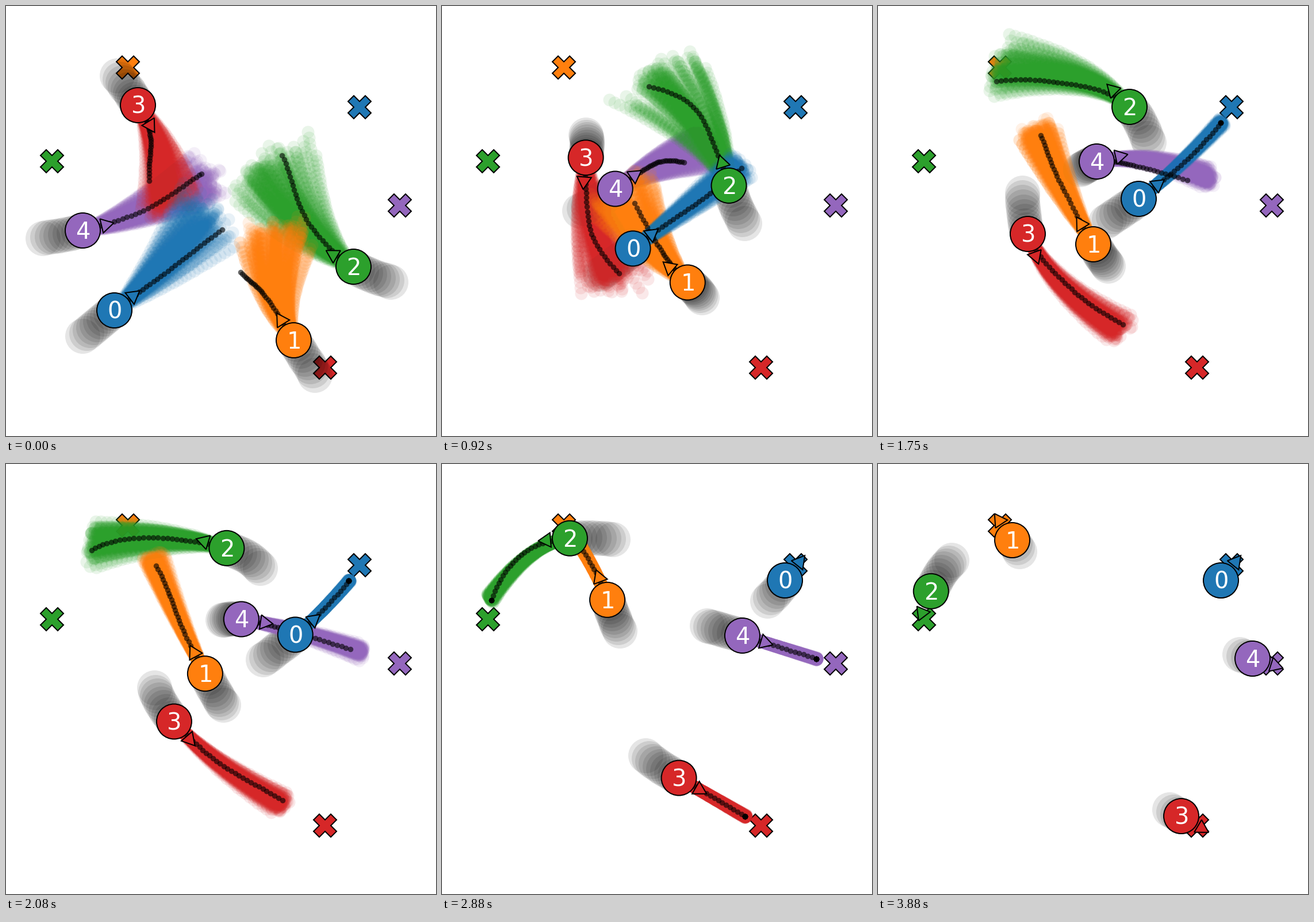
Recreate the animation shown at these times as a matplotlib script. Size 748x748 px, loop 3.92 s.

```python
import numpy as np
import matplotlib.pyplot as plt
from matplotlib.animation import FuncAnimation
from matplotlib.patches import Circle, RegularPolygon

SIZE = 748
FRAMES, INTERVAL = 98, 40
STEPS = 94              # simulation steps per loop, 24 per second
HORIZON, TRAIL = 30, 9  # planned steps ahead, past steps shown
CRUISE = 7.75           # top speed, pixels per step
SAMPLES = 60
RADIUS = 30.5
KEYS = (-9, 0, 14, 30, 42, 59, 81)

fig = plt.figure(figsize=(SIZE / 72, SIZE / 72), dpi=72, facecolor="white")
ax = fig.add_axes([0, 0, 1, 1])
ax.set_xlim(0, SIZE)
ax.set_ylim(SIZE, 0)
ax.axis("off")


class Track:
    """Smooth cubic curve through complex points at given steps."""

    def __init__(self, steps, points):
        self.t, self.p = np.array(steps, float), np.array(points) + 0.5 + 0.5j
        h = np.diff(self.t)
        d = np.diff(self.p) / h
        inner = (d[:-1] * h[1:] + d[1:] * h[:-1]) / (h[:-1] + h[1:])
        self.m = np.r_[2 * d[0] - inner[0], inner, 2 * d[-1] - inner[-1]]

    def at(self, step):
        u = np.clip(step, self.t[0], self.t[-1])
        i = np.clip(np.searchsorted(self.t, u, side="right") - 1, 0, len(self.t) - 2)
        h = self.t[i + 1] - self.t[i]
        s = (u - self.t[i]) / h
        return ((1 + 2 * s) * (1 - s) ** 2 * self.p[i]
                + s ** 2 * (3 - 2 * s) * self.p[i + 1]
                + s * (1 - s) * h * ((1 - s) * self.m[i] - s * self.m[i + 1]))

    def heading(self, step):
        u = min(step, self.t[-1] - 0.5)
        d = self.at(u + 0.4) - self.at(u - 0.4)
        return d / abs(d)


def dots(size, color, alpha, z):
    return ax.plot([], [], "o", ms=size, mew=0, color=color, alpha=alpha, zorder=z)[0]


def place(line, pts):
    line.set_data(pts.real, pts.imag)


class Robot:
    """Drives through its points and stops; the fan shows sampled plans."""

    def __init__(self, index, color, goal, points, stop, spread, lean=0):
        self.path = Track(KEYS[:len(points) - 1] + (stop,), points)
        self.stop, self.spread, self.lean = stop, spread, lean
        self.noise = np.random.default_rng(index + 7).normal(size=(4, SAMPLES))
        ax.plot(goal.real, goal.imag, "X", ms=40, mfc=color, mec="black", mew=2, zorder=1)
        self.trail = dots(2 * RADIUS, "black", 0.1, 2)
        self.fan = dots(22, color, 0.1, 3 - 0.1 * index)
        self.plan = dots(9.5, "black", 0.6, 4)
        z = 5 + 0.1 * index
        style = dict(fc=color, ec="black", lw=2, zorder=z)
        self.body = ax.add_patch(Circle((0, 0), RADIUS, **style))
        self.nose = ax.add_patch(RegularPolygon((0, 0), 3, radius=14.5, **style))
        self.label = ax.text(0, 0, str(index), color="white", fontsize=40,
                             family="DejaVu Sans", ha="center", va="center",
                             zorder=z + 0.05)

    def samples(self, step, pos, head):
        # plans spread around the coming route and narrow close to the end
        ahead = self.path.at(step + HORIZON) - pos
        length = min((abs(ahead) + CRUISE * HORIZON) / 2, abs(self.path.p[-1] - pos))
        narrow = np.clip((self.stop - step) / 67, 0, 1) ** 2
        mean = (np.angle(ahead) + 0.3 * narrow * np.angle(head * np.conj(ahead))
                + np.radians(self.lean) * np.exp(-step / 8))
        c, s = np.cos(0.3 * step), np.sin(0.3 * step)
        bend = np.clip(self.noise[0] * c + self.noise[1] * s, -2.2, 2.2)
        size = length * (1 + 0.06 * narrow * (self.noise[2] * c + self.noise[3] * s))
        turn = np.exp(1j * np.radians(self.spread) * narrow * bend)
        q = np.linspace(0, 1, HORIZON + 1)[1:, None]
        arc = 0.8 * q * (1 - q) * head + q ** 2 * np.exp(1j * mean)
        return (pos + arc * size * turn).ravel()

    def show(self, step):
        pos, head = self.path.at(step), self.path.heading(step)
        place(self.trail, self.path.at(step - np.arange(TRAIL, 0, -1)))
        place(self.plan, self.path.at(step + np.arange(1, HORIZON + 1)))
        place(self.fan, self.samples(step, pos, head))
        tip = pos + 41 * head
        self.body.center = pos.real, pos.imag
        self.nose.xy = tip.real, tip.imag
        self.nose.orientation = np.angle(head) - np.pi / 2
        self.label.set_position((pos.real + 0.7, pos.imag + 3.3))


robots = [
    Robot(0, "tab:blue", 615.5 + 176j,
          [133+573j, 188+529j, 275+465j, 376+388j, 453+335j, 555+249j, 596+202j],
          stop=67, spread=8, lean=-7),
    Robot(1, "tab:orange", 212.5 + 107j,
          [537+641j, 500+581j, 452+506j, 408+462j, 374+414j, 314+302j, 257+170j, 233+132j],
          stop=87, spread=9, lean=27),
    Robot(2, "tab:green", 80 + 269.5j,
          [669+479j, 604+453j, 526+377j, 480+259j, 437+175j, 312+132j, 143+153j, 86+236j],
          stop=95, spread=10),
    Robot(3, "tab:red", 555.5 + 628.5j,
          [193+120j, 229+172j, 250+223j, 249+303j, 260+396j, 342+497j, 487+588j, 527+612j],
          stop=87, spread=9),
    Robot(4, "tab:purple", 685.5 + 346.5j,
          [64+403j, 133+390j, 239+355j, 340+291j, 380+270j, 449+278j, 606+324j, 651+338j],
          stop=87, spread=7),
]


def update(k):
    step = min(int((k * INTERVAL + INTERVAL - 1) * 24 / 1000), STEPS - 1)
    for robot in robots:
        robot.show(step)
    return []


anim = FuncAnimation(fig, update, frames=FRAMES, interval=INTERVAL,
                     repeat=True, repeat_delay=0, cache_frame_data=False)
plt.show()
```
